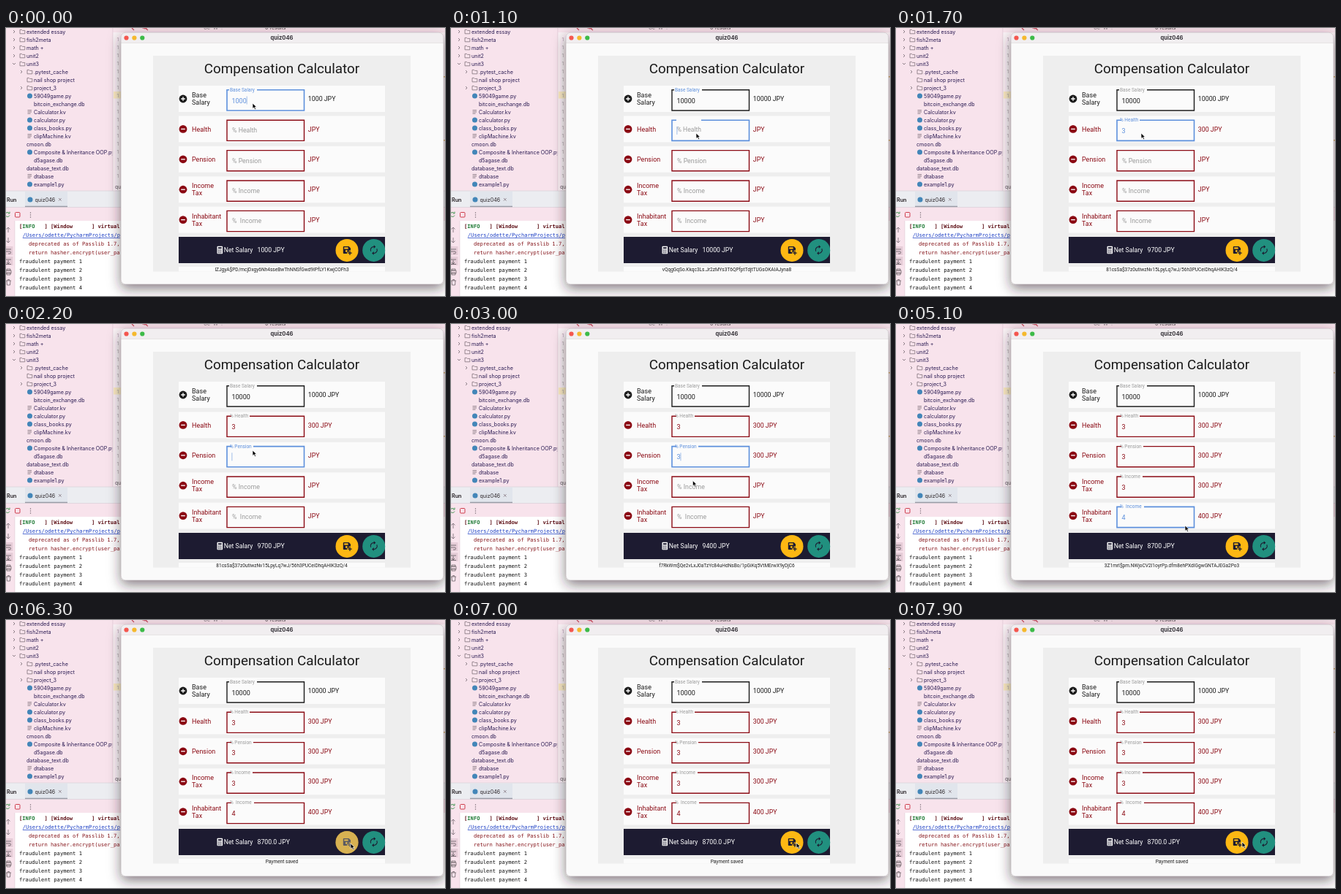
Recreate the animation shown at these times as an HTML page. Size 600x367 px, loop 8000 ms.

```html
<!DOCTYPE html>
<html lang="en">
<head>
<meta charset="utf-8">
<title>Compensation Calculator</title>
<style>
html, body { margin: 0; width: 100%; height: 100%; overflow: hidden; background: #f8e3ec; }
svg { display: block; width: 600px; height: 367px; }
text { white-space: pre; }
.ide { font-family: Inter, sans-serif; }
.mono { font-family: "DejaVu Sans Mono", monospace; }
.app { font-family: Roboto, sans-serif; }
</style>
</head>
<body>
<svg viewBox="0 0 600 367">
  <defs>
    <filter id="shadow" x="-10%" y="-10%" width="120%" height="125%">
      <feDropShadow dx="0" dy="6" stdDeviation="8.5" flood-color="#2e2329" flood-opacity=".58"/>
    </filter>
    <clipPath id="tree"><path d="M0 0H145.5V223H0z"/></clipPath>
  </defs>
  <g id="ide" class="ide"></g>
  <g id="frame" class="app"></g>
  <g id="live" class="app"></g>
  <path id="mouse" d="M0 0V7.4L1.8 5.8L3.1 8.6L4.5 8L3.2 5.3H5.5Z" fill="#000" stroke="#fff" stroke-width=".7"/>
</svg>
<script>
const LOOP = 8000, STEP = 100;
const RED = '#8b0a14', BLACK = '#1c1c1c', BLUE = '#5c8fdc', GREY = '#9b9b9b';
const NAVY = '#1d1b31', YELLOW = '#fdb813', PAPER = '#fbfbfb', INK = '#2a1a52', ICON = '#80737c';

const $ = id => document.getElementById(id);
const rect = (x, y, w, h, fill, more = '') => `<rect x="${x}" y="${y}" width="${w}" height="${h}" fill="${fill}" ${more}/>`;
const disc = (x, y, r, fill, more = '') => `<circle cx="${x}" cy="${y}" r="${r}" fill="${fill}" ${more}/>`;
const line = (d, stroke, w = 1, more = '') => `<path d="${d}" fill="none" stroke="${stroke}" stroke-width="${w}" ${more}/>`;
const fill = (d, color) => `<path d="${d}" fill="${color}"/>`;
const text = (x, y, s, size, color, more = '') =>
  `<text x="${x}" y="${y}" font-size="${size}" fill="${color}" ${more}>${s.replace(/&/g, '&amp;')}</text>`;

// Project tree: kind (d folder, o open folder, p script, k plain file, - none), depth, name
const tree = [
  'd0extended essay', 'd0fish2meta', 'd0math +', 'd0unit2', 'o0unit3',
  'd1.pytest_cache', 'f1nail shop project', 'd1project_3', 'p159049game.py',
  '-1bitcoin_exchange.db', 'k1Calculator.kv', 'p1calculator.py', 'p1class_books.py',
  'k1clipMachine.kv', '-0cmoon.db', 'p1Composite & Inheritance OOP.py', '-1d5agase.db',
  '-0database_text.db', 'k1dtabase', 'p1example1.py'
];

function treeRow(row, i) {
  const [kind, depth] = row, x = 28 + depth * 10, y = 5 + i * 11;
  let s = text(x, y + 2.6, row.slice(2), 7.15, INK);
  if ('dof'.includes(kind)) s += line(`M${x - 9} ${y - 2.6}h2.4l1 1h3.4v4.4h-6.8z`, ICON, .8);
  if (kind === 'd') s += line(`M${x - 18} ${y - 2}l2 2l-2 2`, ICON, .9);
  if (kind === 'o') s += line(`M${x - 19} ${y - 1}l2 2l2 -2`, ICON, .9);
  if (kind === 'p') s += disc(x - 5.5, y, 3.5, '#4386b8');
  if (kind === 'k') s += line(`M${x - 8.5} ${y - 2.3}h5.5m-5.5 2.2h5.5m-5.5 2.2h4`, ICON, .9);
  return s;
}

function drawIde() {
  const log = (y, s, color = '#111', more = '') => text(18, y, s, 7.15, color, `class="mono" ${more}`);
  let s = rect(0, 0, 600, 367, '#f8e3ec') + `<g clip-path="url(#tree)">${tree.map(treeRow).join('')}</g>`;

  // Editor edge and find bar
  s += rect(146, 6, 454, 217, '#fbf3f7') + rect(145.5, 0, .8, 223, '#e2ccd6') + rect(147, 87, 12, 9.5, '#fcefc4');
  for (let y = 18; y < 212; y += 11) s += text(151.5, y, '1', 6.5, '#a99ca4');
  s += text(149, 219.5, 'quiz046', 6.8, '#5b5157');
  s += line('M172 0l3 3M190 0l4 3', '#c9485b', 1.1) + text(186, 2, '47', 7, '#c9485b');
  s += text(270, 1.5, 'Cc  W  .*', 7, '#7d727a') + text(354, 1.5, '0 results', 7, '#4a4046');
  s += rect(596, 66, 4, 1.5, '#d9b06a') + rect(596, 153, 4, 1.5, '#d9b06a');

  // Run panel
  s += rect(0, 223, 600, 144, '#f8e3ec') + rect(0, 223, 600, 22.5, '#ecedf1') + rect(0, 222.6, 600, .8, '#d9d3da');
  s += text(1, 237.6, 'Run', 7.2, '#221c20', 'font-weight="600"') + rect(26, 224, 58, 21, '#e1e5ec');
  s += disc(33, 235, 3.5, '#4386b8') + text(39.5, 237.6, 'quiz046', 7.1, '#2c2529');
  s += line('M72 233l3.6 3.6M75.6 233l-3.6 3.6', ICON, .8) + rect(26, 243.7, 58, 1.6, '#9a9ba6');
  s += rect(0, 245.3, 600, .7, '#dccfd7');
  s += line('M4.5 253.5a3 3 0 1 0 .5 3M5 251.5v2.5h-2.5', '#4f9a5c');
  s += rect(12.5, 252.5, 6.5, 6.5, 'none', 'rx="1" stroke="#cf3d4c"');
  for (const y of [253, 256, 259]) s += disc(33.5, y, .7, '#6d6269');
  s += rect(12, 264, 588, 103, '#fff') + rect(11.6, 264, .7, 103, '#e2ccd6');
  s += rect(0, 299, 9.5, 12, '#e6cdd8') + rect(0, 313, 9.5, 12, '#e6cdd8');
  s += line('M3 280v-7m-2.5 2.5l2.5 -2.5l2.5 2.5M3 287v7m-2.5 -2.5l2.5 2.5l2.5 -2.5', ICON, .9);
  s += line('M0 303h7m-7 3h5a1.5 1.5 0 0 1 0 3h-2M0 317h7M3 318v5m-2 -2l2 2l2 -2M0 323.5h7', '#6d6269', .9);
  s += line('M1 332h5v-2h-5zM0 332h7v4h-7zM1 335h5v3h-5z', '#6d6269', .8);
  s += line('M0 346h7M1 346l.5 6h4l.5 -6M2.5 346v-1.5h2v1.5', '#6d6269', .8);

  // Console
  s += log(274.3, '[<tspan fill="#1f7a35">INFO</tspan>   ] [Window      ] virtual', '#5e1016', 'font-weight="700"');
  s += text(22.8, 286.3, '/Users/odette/PycharmProjects/p', 7.15, '#1c3fc4', 'class="mono" text-decoration="underline"');
  s += log(298.3, '   deprecated as of Passlib 1.7,', '#86161c') + log(310.3, '   return hasher.encrypt(user_pa', '#86161c');
  for (let n = 1; n <= 4; n++) s += log(310.3 + n * 12, `fraudulent payment ${n}`);
  $('ide').innerHTML = s;
}

const rows = [
  { label: ['Base', 'Salary'], hint: 'Base Salary', gap: 343, on: -1000, off: 1080, edits: [[-1000, '1000'], [400, '10000']] },
  { label: ['Health'], hint: '% Health', gap: 333, on: 1080, off: 2000, edits: [[1600, '3']] },
  { label: ['Pension'], hint: '% Pension', gap: 338, on: 2000, off: 3100, edits: [[2600, '3']] },
  { label: ['Income', 'Tax'], hint: '% Income', gap: 337, on: 3100, off: 4250, edits: [[3600, '3']] },
  { label: ['Inhabitant', 'Tax'], hint: '%  Income', gap: 339, on: 4250, off: 6150, edits: [[4700, '4']] }
];
rows.forEach((r, i) => { r.y = 79 + i * 41.4; r.ink = i ? RED : BLACK; });

const SAVED = 6250;
const notes = [
  [0, 'lZJgyA$PD/mcjDxgy6Nh4sseBwThNNSfGwd9IPfLY1KwjCOFh3'],
  [400, 'vQqgGqSo.Kkqc3Ls.Jr2zMYs3T6QPfptTdjtTUGsOKAIAJyna8'],
  [1600, '81csSa$37z0utiwzNv15LpyLq7wJ/56h3PUCeiDhqAHIK3zQ/4'],
  [2600, 'f7RkWm$Qe2vLxJ0aTzYc84uHdNsBo/1pGiKq5VtMErwX9yDjC6'],
  [3600, 'b3wDhB$DXWGumZHvpYIQ2vNvvsqSY8yRLDwIBxvsWcp5UzdrE6'],
  [4700, '3Z1mrI$pm.NWjoCV2I1oyrPp.dfm8ehPXdIGgwGNTAJEGa2Po3'],
  [SAVED, 'Payment saved']
];
const path = [
  [0, 337, 103], [600, 337, 103], [1000, 335, 144], [1700, 335, 144], [1950, 337, 173],
  [2700, 337, 173], [3050, 330, 217], [3600, 330, 217], [3950, 321, 268], [4800, 321, 268],
  [5100, 395, 276], [5500, 440, 292], [5900, 471, 306], [6700, 471, 306], [7300, 473, 304], [LOOP, 473, 304]
];

const clamp = v => Math.min(1, Math.max(0, v));
const latest = (list, t) => list.reduce((v, [at, s]) => t >= at ? s : v, '');

function drawFrame() {
  let s = rect(157, 6, 441, 345, '#fafafa', 'rx="6" filter="url(#shadow)"');
  s += fill('M157 20.5V12a6 6 0 0 1 6 -6H592a6 6 0 0 1 6 6V20.5z', '#f1eef0');
  s += rect(157, 20.3, 441, .6, '#dcd8da') + rect(157.2, 6.2, 440.6, 344.6, 'none', 'rx="6" stroke="#b9aeb4" stroke-width=".5"');
  ['#f4574f', '#f5b92e', '#3dbb48'].forEach((c, i) => s += disc(164.5 + i * 10.9, 13.5, 3.1, c));
  s += text(377, 16.3, 'quiz046', 7.6, '#37343a', 'text-anchor="middle" font-weight="700" font-family="Inter, sans-serif"');
  s += rect(201, 38, 352, 295.5, '#eeeeee');
  s += text(377, 62, 'Compensation Calculator', 18.85, '#1b1b1b', 'text-anchor="middle"');
  rows.forEach((r, i) => {
    const c = r.y + 18;
    s += rect(236, r.y, 282, 36, PAPER) + disc(242, c, 5.4, r.ink);
    s += line(`M239.2 ${c}h5.6` + (i ? '' : `M242 ${c - 2.8}v5.6`), '#fff', 1.3);
    const top = r.label.length > 1 ? c - 2 : c + 3.2;
    r.label.forEach((w, n) => s += text(254, top + n * 10, w, 9, r.ink));
  });
  s += rect(236, 286, 282, 36, NAVY) + rect(236, 327, 282, 6.5, PAPER);
  s += rect(288.5, 298.8, 7.6, 10.4, '#fff', 'rx="1"') + rect(289.9, 300.2, 4.8, 2, NAVY);
  for (let n = 0; n < 9; n++) s += rect(289.7 + n % 3 * 1.9, 303.4 + (n / 3 | 0) * 1.9, 1.2, 1.1, NAVY);
  s += text(297.8, 307.3, 'Net Salary', 8.7, '#fff');
  $('frame').innerHTML = s;
}

function field(r, t) {
  const value = latest(r.edits, t), focus = t >= r.on && t < r.off;
  const top = r.y + 5.8, bottom = r.y + 34, base = r.y + 22.7;
  const float = clamp((t - r.on) / 200), lit = t >= r.on && t < r.off + 100;
  const ink = focus ? BLUE : r.ink, start = r.ink === RED ? 308 : 305;
  const edge = t >= r.on
    ? `M${start} ${top}H302V${bottom}H407.5V${top}H${r.gap + 10 * (1 - float)}`
    : `M302 ${top}H407.5V${bottom}H302z`;
  let s = line(edge, ink, focus ? 1.6 : 1.4);
  s += text(309 - 3 * float, base - 14.9 * float, r.hint, 8.8 - 2.3 * float, lit && float > .2 ? BLUE : GREY);
  if (value) s += text(308.5, base + .8, value, 9, ink);
  if (focus && (t - r.on) % 1000 < 500) s += rect(308.5 + value.length * 5.06, base - 8.2, .8, 11, BLUE, 'opacity=".7"');
  return s;
}

function buttons(t) {
  const press = clamp((t - 6150) / 100) * clamp((6900 - t) / 500);
  let s = disc(466, 304.4, 15.5, YELLOW) + disc(502.7, 304.4, 15.5, '#21907f');
  s += fill('M461.8 299H468.6L471 301.4V304.6H468.6V307H466.2V309H461.8a1 1 0 0 1 -1 -1V300a1 1 0 0 1 1 -1z', NAVY);
  s += rect(462.2, 300.3, 5.4, 2.3, YELLOW) + disc(465.3, 305.5, 1.4, YELLOW);
  s += line('M470 305.4v5.4M467.3 308.1h5.4', NAVY, 1.4);
  s += line('M498.6 305.8A4.4 4.4 0 0 1 503.2 299.6M506.8 302.2A4.4 4.4 0 0 1 502.2 308.4', NAVY, 1.1);
  s += fill('M502.7 297.3l2.6 2.3l-2.6 2.3zM502.7 306.1l-2.6 2.3l2.6 2.3z', NAVY);
  return s + disc(466, 304.4, 15.5, '#a8a8a0', `opacity="${.45 * press}"`);
}

function live(t) {
  const values = rows.map(r => latest(r.edits, t)), base = +values[0];
  let net = base, s = '';
  rows.forEach((r, i) => {
    const cut = i ? base * values[i] / 100 : base;
    if (i) net -= cut;
    s += field(r, t) + text(412.8, r.y + 21.1, (cut ? cut + ' ' : '') + 'JPY', 8.8, r.ink);
  });
  s += text(343.5, 307.3, `${net}${t >= SAVED ? '.0' : ''} JPY`, 8.7, '#fff') + buttons(t);
  return s + text(377, 333, latest(notes, t), 6.55, '#1b1b1b', 'text-anchor="middle"');
}

function mouseAt(t) {
  const n = path.findIndex(p => p[0] > t), [a, ax, ay] = path[n - 1], [b, bx, by] = path[n];
  const u = (t - a) / (b - a), e = u * u * (3 - 2 * u);
  return `translate(${ax + (bx - ax) * e} ${ay + (by - ay) * e})`;
}

let shown = -1;
function tick(now) {
  const t = Math.floor(now % LOOP / STEP) * STEP;
  if (t !== shown) {
    shown = t;
    $('live').innerHTML = live(t);
    $('mouse').setAttribute('transform', mouseAt(t));
  }
  requestAnimationFrame(tick);
}

drawIde();
drawFrame();
tick(performance.now());
</script>
</body>
</html>
```
